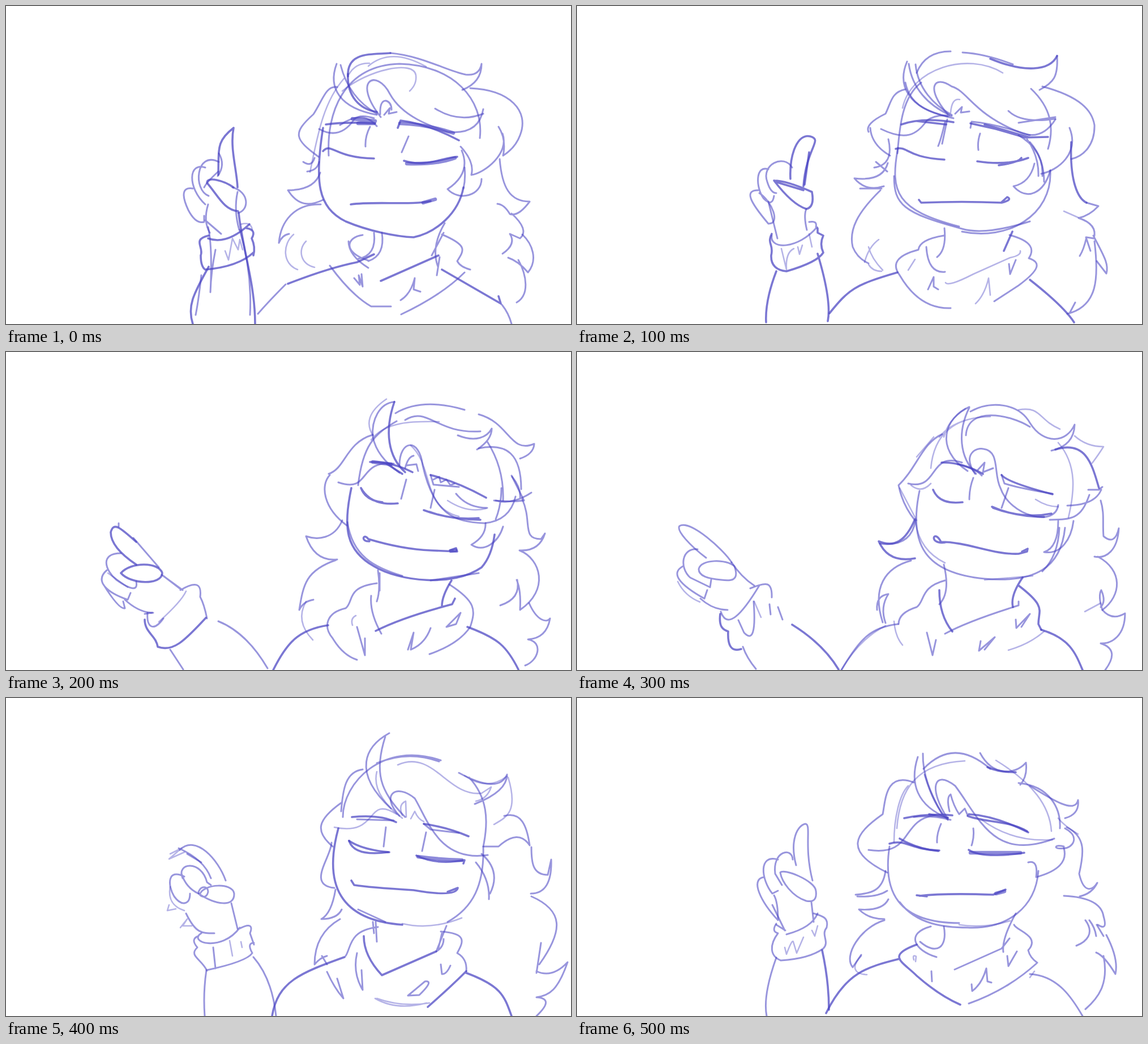
An HTML page that plays this animation: 998 by 561 pixels, repeating every 600 ms.

```html
<!DOCTYPE html>
<html lang="en">
<head>
<meta charset="utf-8">
<title>Pointing sketch</title>
<style>
html, body { margin: 0; width: 100%; height: 100%; overflow: hidden; background: #fff; }
svg { display: block; width: 100vw; height: 100vh; }
path { fill: none; stroke: #4843c3; stroke-width: 3; stroke-opacity: .56; stroke-linecap: round; stroke-linejoin: round; }
.light { stroke-width: 2.6; stroke-opacity: .4; }
.bold { stroke-width: 3.6; stroke-opacity: .72; }
.fat { stroke-width: 6.5; stroke-opacity: .62; }
g { visibility: hidden; animation: show 600ms step-end infinite; animation-delay: calc(var(--i) * 100ms - 600ms); }
@keyframes show { 0% { visibility: visible; } 16.666%, 100% { visibility: hidden; } }
</style>
</head>
<body>
<svg viewBox="0 0 998 561" preserveAspectRatio="none">

<g style="--i:0">
<path class="bold" d="M604 124C602 80 645 86 679 83"/>
<path d="M679 83C735 88 780 115 812 121Q836 124 840 102Q840 135 806 148"/>
<path d="M570 264C566 190 595 105 695 102C790 104 845 165 837 233"/>
<path class="light" d="M594 150C640 112 720 95 724 122Q726 138 713 150M640 106Q680 72 742 107M606 120Q618 100 642 101"/>
<path d="M584 102C568 145 590 180 655 192"/>
<path d="M591 104C600 140 620 170 655 190"/>
<path class="bold" d="M604 120C602 160 625 182 655 187"/>
<path d="M585 143C565 140 560 165 543 191C505 225 510 235 552 266"/>
<path class="light" d="M597 128C560 170 550 230 537 293"/>
<path d="M553 217C580 232 600 222 615 200Q625 190 650 198"/>
<path d="M662 196C610 130 655 110 678 155C700 195 750 212 780 222Q835 228 843 182"/>
<path d="M758 181Q800 207 843 190M661 191Q660 167 671 167Q681 170 681 183M668 192L678 180L676 190L690 187"/>
<path d="M820 145C890 148 925 185 908 228Q900 250 878 264Q884 235 870 213M877 225C890 260 845 295 822 298Q828 275 803 248"/>
<path d="M805 255Q822 295 780 323C800 345 840 335 840 305"/>
<path d="M872 270C876 320 890 345 925 345Q905 372 890 367Q880 350 868 349M893 366Q925 395 908 410L890 402Q902 420 877 437"/>
<path d="M912 403C930 420 940 448 922 470Q905 450 887 444M905 448C920 475 925 510 902 523"/>
<path d="M525 275Q540 285 545 268M532 292Q550 290 553 275M555 294Q545 325 498 325C515 352 535 354 560 342M556 350C510 348 485 380 482 418Q488 404 500 402"/>
<path class="light" d="M508 403C488 420 488 455 515 465M530 415C515 430 520 455 545 461"/>
<path class="bold" d="M560 215C545 310 550 355 600 380C640 397 690 407 720 408C760 400 800 365 808 320"/>
<path d="M808 322Q812 305 810 285M590 210Q630 182 655 212M643 213Q634 230 635 248M711 230L699 258"/>
<path class="bold" d="M565 209Q600 204 652 207M692 215L697 202Q745 208 800 237M560 256C575 240 580 268 650 269M703 273C740 285 770 268 797 266"/>
<path class="fat" d="M612 199L652 203M622 207H650M696 207Q740 208 790 224M708 278Q760 280 793 268M737 347L758 341"/>
<path class="bold" d="M609 350C650 344 720 352 750 344"/>
<path d="M650 400Q655 440 622 446M664 400Q670 440 640 450M630 404C600 408 595 435 640 449M605 415Q605 440 640 462"/>
<path class="bold" d="M498 490Q570 462 620 452L650 438M662 485Q710 464 764 440M770 465L874 525L870 512"/>
<path d="M775 383Q750 425 763 460M770 403C815 422 810 430 797 450Q802 460 820 465M766 443L761 475M773 400L752 440"/>
<path d="M572 458Q610 510 645 530H680M698 544Q770 510 810 470M494 491Q465 520 445 543M876 527Q888 542 893 561"/>
<path d="M615 480L625 492L623 475L630 495L628 473M697 519Q715 508 722 480L720 500L732 504"/>
<path class="bold" d="M402 215C372 238 376 250 375 298M402 215C395 250 408 290 409 320"/>
<path d="M376 275C335 255 330 325 358 335M352 285C322 275 320 320 352 350M330 322C305 318 315 345 322 360Q335 385 350 381V370M376 260Q388 280 374 300"/>
<path class="bold" d="M402 320C385 308 355 300 355 312C375 335 385 360 410 362"/>
<path d="M375 292Q355 310 350 320M400 320C430 328 430 360 410 365M409 328Q402 360 412 395M357 350Q348 380 360 400M352 378L380 402"/>
<path class="bold" d="M357 410Q390 422 430 385M358 405C328 412 350 425 344 440Q344 460 352 465Q410 460 437 435M425 392Q443 395 434 410Q441 425 437 440"/>
<path class="light" d="M415 385Q433 380 435 395M387 432L393 448L400 410L410 430L413 412L418 430"/>
<path d="M357 390Q365 425 361 505M370 430Q362 470 361 505M345 475Q340 520 335 545M413 395Q435 470 431 545"/>
<path class="bold" d="M358 460C330 510 320 530 330 561M411 365C418 430 440 490 440 561"/>
</g>

<g style="--i:1">
<path d="M600 118Q615 80 660 80M681 82Q720 84 770 103M845 200Q820 240 780 222C700 190 690 150 662 142C630 120 615 145 655 191"/>
<path class="bold" d="M730 93C790 118 835 115 848 88"/>
<path d="M848 88C850 125 842 135 817 148"/>
<path class="light" d="M575 180C590 110 690 80 752 118M660 188Q662 162 676 165"/>
<path d="M566 260C570 210 575 160 608 135M583 98C565 140 585 180 655 195"/>
<path d="M586 102C592 145 620 175 658 192M580 135C588 175 620 188 665 198"/>
<path d="M598 103C602 145 630 175 662 192"/>
<path d="M580 147C555 152 555 170 545 190Q508 208 515 222M518 215Q520 245 553 264M537 217C580 238 600 228 618 202Q635 190 662 194"/>
<path d="M762 185Q785 208 845 199M780 206L845 196M668 190L680 178L678 188L693 186M802 146C838 180 843 215 832 252"/>
<path d="M822 142C890 160 910 185 914 210C915 245 895 265 873 270M870 215C888 260 850 290 820 296"/>
<path d="M780 228Q825 255 822 300M795 235Q816 265 815 300"/>
<path d="M808 278Q800 312 771 318C795 345 825 330 836 290"/>
<path class="bold" d="M873 240C870 310 885 340 900 347"/>
<path d="M900 347L921 353Q905 370 886 374Q920 385 913 410L900 408Q895 430 888 441M899 408L907 432M912 405C930 440 940 455 935 472L918 450"/>
<path d="M914 415C922 480 920 530 866 543M880 523L870 542"/>
<path class="light" d="M860 362L885 373M533 412Q515 425 508 452M515 425Q520 445 540 466M515 456Q522 468 538 468"/>
<path d="M550 235C557 265 548 282 525 285M528 275L548 292M549 277Q540 310 490 304Q510 328 542 318M500 322H538M536 325C495 365 480 395 487 425Q495 445 515 454"/>
<path d="M567 250C552 330 565 360 675 389"/>
<path d="M560 300C560 350 575 365 680 393Q720 405 800 380"/>
<path d="M680 398C760 415 840 370 836 290M800 240Q825 268 825 310"/>
<path class="bold" d="M573 209Q610 196 665 205M600 203L652 209M832 231L792 232L740 217L695 207M720 209L800 232"/>
<path d="M695 215L697 204Q740 208 800 228M650 205Q643 235 638 247M654 200L645 243M712 225Q707 240 709 254"/>
<path class="bold" d="M563 252C585 246 580 267 649 271M707 274Q760 282 797 268M745 281Q780 276 785 268M604 342L608 347Q680 344 750 347Q770 342 760 337L750 346"/>
<path d="M649 392Q653 430 636 443M648 405Q605 412 603 430C565 440 555 455 570 475Q605 535 660 533M617 425Q620 472 650 469"/>
<path class="bold" d="M769 398L754 432"/>
<path d="M764 404C805 415 808 430 798 445C820 452 818 465 780 493L737 521"/>
<path class="light" d="M651 488Q655 496 700 473L765 444Q785 440 783 432M597 447L585 466M704 525Q720 510 727 480L730 510"/>
<path d="M620 500L630 478L630 495L638 500M763 455L765 473L775 448"/>
<path class="bold" d="M800 483Q860 530 878 558M566 470C490 492 480 500 446 542M377 305C375 260 390 225 412 230C435 236 405 250 400 318"/>
<path class="bold" d="M410 258L402 315"/>
<path d="M380 285C365 260 325 280 336 310Q342 330 352 330M338 288C315 280 315 320 330 340Q345 355 348 335M320 325C295 325 305 345 338 384C360 385 345 345 322 330"/>
<path class="bold" d="M348 308Q370 308 415 328Q420 355 405 358Q380 350 348 308M350 310L400 325"/>
<path d="M405 358Q400 370 406 395M338 345L354 410M410 381Q425 378 422 390M344 405C340 430 390 430 424 390"/>
<path class="bold" d="M344 402C335 420 348 420 343 440Q342 465 370 468Q425 452 435 435Q428 420 435 405L425 400V392M352 468Q332 520 334 558M425 437Q450 520 443 556"/>
<path class="light" d="M361 428L370 465Q368 435 383 428M390 425L393 438L398 422M410 402L415 425"/>
</g>

<g style="--i:2">
<path class="light" d="M672 83Q625 115 650 150M645 155C670 122 720 122 765 123M715 165C755 200 735 275 800 290"/>
<path d="M686 88C660 90 645 120 648 150Q655 185 695 213"/>
<path class="bold" d="M686 88C668 140 675 185 705 212"/>
<path d="M688 108Q735 80 810 102M705 120C745 95 760 145 838 140M835 110C890 125 890 180 933 162Q932 180 908 188"/>
<path d="M798 147C830 160 850 150 858 135Q858 155 832 172M850 158Q880 205 878 262M622 235C630 165 650 145 690 122"/>
<path d="M648 146C600 160 600 205 570 215M572 217C555 235 560 275 602 306M587 230C645 250 620 190 685 197"/>
<path d="M695 200C695 155 730 150 736 200C755 285 790 300 845 302Q890 298 900 255"/>
<path d="M795 250Q815 275 850 275M705 205Q710 185 720 183M708 200L725 198L728 210"/>
<path class="light" d="M780 262Q815 285 848 276"/>
<path d="M835 170C885 160 910 180 910 242M893 218L915 262Q890 265 862 262"/>
<path d="M928 248Q895 270 865 262M894 220Q910 240 908 258M875 240Q875 270 865 295M847 302Q848 325 822 340C845 355 870 335 878 308"/>
<path d="M912 260C930 300 910 330 945 330L952 320Q942 352 907 350C945 365 960 420 908 455Q910 420 902 402M903 402Q910 435 873 447"/>
<path d="M924 443C938 475 955 478 961 470Q955 505 922 507C950 512 940 545 917 553"/>
<path d="M594 297C580 330 550 332 530 325Q545 370 585 366M583 367C530 385 525 410 518 455Q525 440 543 437"/>
<path class="light" d="M530 440Q510 475 542 508"/>
<path class="bold" d="M610 240C595 310 600 350 650 378C695 405 790 415 840 380Q858 360 863 322"/>
<path d="M603 300C612 360 650 380 700 395M750 403L835 390"/>
<path class="bold" d="M643 194Q680 193 718 212M672 197L700 215M750 217Q800 230 848 257"/>
<path class="fat" d="M648 194L680 198M786 351L794 350"/>
<path d="M750 217L755 234L800 238M755 225L765 220L768 230L778 225L785 235L792 232M707 225L698 259M757 243L750 275"/>
<path class="bold" d="M627 240Q645 272 692 267M627 240Q635 262 665 265M738 279Q780 295 838 296M748 282Q790 297 835 293"/>
<path class="bold" d="M642 334C625 335 632 318 640 330Q700 348 750 350L797 352L795 346L784 350"/>
<path d="M657 385Q662 420 655 440M660 390V421M655 408C600 415 615 440 600 452C565 460 560 485 577 505Q595 535 620 543M645 430Q642 460 663 497"/>
<path class="bold" d="M787 403Q770 430 770 448M653 492Q700 468 788 445L793 435"/>
<path d="M783 410C830 440 830 455 820 485Q800 515 748 533M620 485L634 535V505M710 525L720 495L715 525Q740 515 750 487M778 485L803 460L795 480L778 485"/>
<path class="light" d="M612 482Q608 470 618 465M180 390L215 415M318 422Q310 440 270 476"/>
<path class="bold" d="M815 485C870 505 885 520 905 560M569 482C515 490 495 515 472 561M230 335C200 308 190 300 185 318Q185 345 230 375"/>
<path d="M199 302V308M225 328L270 380M203 355C165 355 175 385 195 402Q235 430 230 405M178 385C155 405 180 425 215 437L220 425M172 410Q200 455 210 452L207 440M210 437Q235 460 260 460"/>
<path class="bold" d="M203 390C220 370 270 370 276 390C275 412 220 410 203 390"/>
<path d="M275 393L312 420M278 395L308 418M308 420C342 400 345 415 343 432Q350 445 355 470M250 460C248 485 260 495 278 470"/>
<path class="bold" d="M245 472C245 495 265 500 268 520C295 530 315 510 353 469"/>
<path d="M245 462L258 460M290 525L313 560M375 475Q425 495 462 558"/>
</g>

<g style="--i:3">
<path d="M693 97C650 115 630 170 690 210M693 98C672 140 675 185 705 215"/>
<path class="light" d="M686 100Q655 120 648 150M640 150Q660 125 700 117M625 205C630 150 660 115 730 114"/>
<path d="M695 105C730 85 780 90 800 125C825 165 865 160 879 128Q878 165 838 174M687 147C690 95 765 110 800 132"/>
<path class="light" d="M780 102C820 95 815 120 853 136M850 160C885 200 878 250 868 292M879 148Q900 167 930 167Q922 180 910 196"/>
<path class="bold" d="M845 172C900 155 910 200 922 240"/>
<path d="M928 238L922 243H903M926 243Q915 270 866 271M905 252C890 295 875 295 835 296"/>
<path d="M645 145C610 160 600 205 568 235Q575 270 597 297M585 232C640 245 620 175 680 195"/>
<path class="light" d="M630 150L600 185M570 240L600 297M590 235Q608 250 625 232M810 260Q830 273 850 273M925 443L897 458"/>
<path d="M703 215C680 180 705 168 718 171C748 175 735 215 748 240C765 290 845 310 850 270M708 208L720 195L717 212L735 205"/>
<path d="M850 298Q850 345 825 353C855 358 873 330 877 298M535 338Q590 345 598 297"/>
<path class="bold" d="M597 295C580 335 560 345 533 334Q550 373 597 364"/>
<path d="M590 368C545 380 520 415 540 477M530 455Q528 430 550 427Q535 450 545 478"/>
<path d="M925 262C932 285 928 300 930 325Q950 342 957 311C955 350 935 365 914 361M920 361C965 385 962 430 928 455Q920 430 926 420Q935 440 925 450"/>
<path d="M928 455Q945 475 968 461C968 500 945 515 925 514Q960 525 933 561"/>
<path d="M605 245C585 340 615 390 720 400C810 408 855 380 862 310"/>
<path class="light" d="M598 300Q605 350 650 372M720 402L805 395"/>
<path d="M852 310Q850 360 822 387M672 198Q705 206 715 218M750 217L755 232Q780 240 840 250M700 222Q693 240 693 260M762 240L750 275"/>
<path class="bold" d="M644 195Q680 194 717 215M840 251Q760 230 750 217M629 243Q640 270 681 265M733 273Q770 290 825 291M735 275Q790 295 838 285"/>
<path class="bold" d="M650 336C620 340 630 310 643 335C690 335 735 358 780 356L795 352L796 347L786 352"/>
<path d="M648 375Q660 425 640 445M650 403C605 415 615 440 600 450Q568 460 568 480M650 497Q690 475 780 447V440M775 472L776 487L800 462L785 485"/>
<path class="bold" d="M787 398Q765 430 770 450M640 420Q640 465 663 493M780 412C830 450 815 455 815 480L820 490"/>
<path class="light" d="M825 493Q800 515 762 526M560 475Q562 502 575 517M545 483Q500 505 467 561"/>
<path d="M618 495L628 535L634 508M710 527L713 510M710 527L738 503L720 525M567 480C520 485 500 505 467 561"/>
<path class="bold" d="M820 490C870 505 880 530 893 561M380 481Q435 515 462 560"/>
<path d="M228 363C200 342 175 315 181 307C200 295 260 350 273 371M215 383C218 365 265 365 278 378C288 405 270 404 255 402C230 400 215 395 215 383"/>
<path d="M213 348C185 345 180 380 200 398L235 415L237 402M187 378C165 390 180 410 225 435L230 420M218 435Q240 455 266 455M273 371Q290 397 313 412"/>
<path class="light" d="M178 405Q190 430 217 441M313 440L325 468"/>
<path d="M322 412C290 465 265 490 254 458M306 417C335 405 345 405 344 433M285 473L295 495Q318 520 312 440M340 445L342 463M355 450L363 472"/>
<path class="bold" d="M253 462C250 485 258 490 267 493Q265 532 290 524"/>
<path d="M293 520Q300 540 316 559"/>
</g>

<g style="--i:4">
<path d="M677 62C635 85 610 130 680 195M670 68C650 130 660 165 705 210"/>
<path class="light" d="M655 130Q645 170 700 212M692 118C755 90 780 175 840 168L857 157Q850 178 830 182"/>
<path d="M595 210C595 150 665 75 768 110M655 115Q710 92 765 112"/>
<path d="M800 132Q870 170 885 135Q885 165 828 187M818 140C850 175 853 215 843 262"/>
<path class="light" d="M810 137Q850 165 885 138M887 140C905 200 885 210 862 223M700 207Q692 188 706 182L707 210M715 213L722 200Q728 214 738 218"/>
<path d="M880 208C910 200 920 225 925 260Q905 230 870 262H845M630 126C600 130 595 160 592 200M592 185C550 215 545 235 577 262"/>
<path class="light" d="M580 228C660 245 635 170 690 205"/>
<path d="M695 208C660 170 690 150 722 177C745 215 765 290 851 277"/>
<path d="M928 263C928 290 930 312 957 312L963 285Q965 345 927 345M928 350C985 375 985 410 942 470M945 432L937 485M937 482Q965 495 992 466C975 515 960 525 937 528Q970 530 937 561"/>
<path d="M840 275Q875 305 855 345M830 290Q855 320 853 355M575 255C575 280 530 330 580 335M582 338Q575 380 557 390Q585 390 593 373M590 390C555 410 545 440 545 470Q555 458 567 455M558 455L567 470"/>
<path class="bold" d="M587 230C560 330 590 392 700 400"/>
<path d="M622 373L670 395M780 395C825 370 845 330 843 262"/>
<path class="light" d="M700 398Q750 410 805 388"/>
<path class="bold" d="M611 210Q660 205 689 219M738 222Q780 228 817 244M606 252Q630 268 677 272"/>
<path class="bold" d="M606 252Q615 280 675 272M725 278Q760 295 810 286L808 292"/>
<path class="fat" d="M728 280Q765 285 805 286"/>
<path d="M620 214L685 216M738 222L750 232L800 238M671 228L667 262M742 237L735 270"/>
<path class="bold" d="M610 322L615 330Q640 334 720 339Q795 352 798 335L780 342M632 420Q632 455 664 489L760 447"/>
<path d="M653 395L655 430M648 395L650 415M778 402L760 447M770 415L763 445M657 404C605 410 610 440 600 455M760 447Q773 440 773 425"/>
<path d="M768 412C815 415 808 430 797 450Q815 460 813 482"/>
<path class="bold" d="M813 482Q785 510 745 545M813 485C875 508 880 525 893 561M598 457C520 485 480 500 470 561"/>
<path class="light" d="M652 530Q690 552 743 538M655 530Q700 546 748 538"/>
<path d="M567 483Q580 512 596 530L585 495M620 450Q612 485 630 515L628 480M710 525L740 500Q757 498 730 524L710 525M768 470L770 487Q778 488 785 472"/>
<path d="M437 457Q470 495 477 561M354 480Q348 520 351 561M307 268C335 240 375 285 388 322M305 265Q350 285 362 318"/>
<path class="light" d="M290 275L310 265L288 284L315 272M290 333C285 360 300 370 315 375M288 365L285 375L300 372M308 405L320 390L312 402H328"/>
<path d="M320 275L345 290M343 345C350 328 400 325 403 345C404 370 370 365 340 345M340 342C345 330 357 332 357 342C354 355 342 352 340 342"/>
<path d="M312 318C300 290 345 285 355 325L362 330M310 310Q318 335 340 345M315 315C285 300 285 330 297 350C310 368 325 365 325 345M318 380C335 415 345 415 368 415M398 362L409 407"/>
<path d="M345 415C320 430 380 450 413 405M340 420Q325 425 338 440C322 455 345 460 355 481M355 480Q425 465 435 450Q425 432 438 432M412 407C435 395 435 405 431 415L438 435M366 440L370 477"/>
<path class="light" d="M395 428L400 455M415 430L417 440"/>
</g>

<g style="--i:5">
<path d="M602 104C587 150 600 190 655 212M611 98C610 135 625 170 645 205"/>
<path d="M614 135Q630 190 655 215M612 125C650 85 690 90 730 125"/>
<path class="light" d="M565 230C570 160 600 115 685 111M560 255C560 210 570 170 585 155M740 110C805 150 835 190 838 235"/>
<path d="M712 97C735 140 775 135 793 114Q796 138 783 153M780 150C835 155 855 195 853 230"/>
<path class="bold" d="M725 122Q745 131 775 131"/>
<path d="M800 155C840 180 880 205 885 180Q888 205 862 212M862 230C890 245 875 265 860 265C840 268 843 257 860 262"/>
<path d="M595 149C545 130 545 180 540 205C490 240 470 270 548 308M515 268C595 280 570 215 632 207"/>
<path d="M655 213C620 160 630 125 668 155C710 210 735 290 843 248"/>
<path class="light" d="M715 215Q770 255 840 250M850 212Q860 225 885 240"/>
<path d="M658 200Q652 175 660 170Q665 190 675 205L685 195L690 207"/>
<path d="M865 228C900 245 895 275 887 310C895 345 910 340 919 326Q910 345 888 350M860 349Q925 352 930 385Q938 412 920 400"/>
<path d="M898 392C915 415 900 430 882 437M905 392Q915 405 917 420M918 400L930 420M935 418Q957 460 951 487Q932 455 917 449M930 455C940 505 920 530 898 549"/>
<path d="M860 265Q870 300 811 316Q815 285 797 290M545 305C540 340 520 345 492 347M548 340Q530 352 495 350M550 355Q540 376 498 373Q515 390 543 390M543 392C500 405 470 455 487 475L502 453"/>
<path class="light" d="M502 455C483 475 490 487 512 488M675 400Q720 407 765 393"/>
<path d="M552 262C540 340 565 397 675 397M570 360C600 400 650 405 690 405C760 408 810 370 815 305"/>
<path class="bold" d="M578 212Q620 203 663 207M692 205Q740 208 797 237M552 257C580 248 590 268 640 269"/>
<path class="bold" d="M622 205L655 211M690 208C720 220 760 215 795 235M570 248Q600 266 638 270M692 268C715 283 770 276 790 273"/>
<path class="fat" d="M695 273H783M740 345L755 341"/>
<path d="M595 210Q625 206 660 215M643 222Q635 240 636 255M700 230Q702 245 697 260"/>
<path class="bold" d="M600 348L618 350M605 349Q650 344 735 347L757 338"/>
<path d="M648 403C655 440 635 455 606 430M625 403C580 415 595 445 635 457M775 380Q750 425 753 448M667 479L750 442L764 424"/>
<path d="M772 400C775 410 820 420 797 445Q800 458 813 467M692 539Q760 515 812 468M626 482L627 500M697 505L698 517Q715 505 723 477L725 500L732 502M760 455L762 473L777 447"/>
<path class="bold" d="M600 435C545 455 575 465 600 490Q640 525 677 541M570 460C510 475 475 485 440 556"/>
<path class="light" d="M595 462Q592 452 599 456L598 465M800 493L808 482"/>
<path d="M800 487C850 490 875 530 893 561M387 295C375 250 390 225 403 222C415 222 400 260 416 322"/>
<path d="M381 285C380 262 345 270 350 310L362 330M355 285C320 275 325 320 345 345L355 340M330 316C305 320 325 360 355 392Q355 360 348 348"/>
<path d="M359 308C365 300 420 322 422 340Q425 362 405 358C380 350 362 325 359 308M345 365L367 410M414 360L418 395M370 417Q415 405 425 380M352 400L368 410"/>
<path d="M352 398Q343 412 355 415C340 435 340 455 360 463Q410 460 435 442C447 430 430 418 441 405C445 388 435 385 418 380"/>
<path class="light" d="M367 440L370 452Q380 425 382 430L388 450L400 422M415 410L420 420L425 402"/>
<path d="M352 458Q328 525 335 561"/>
<path class="bold" d="M433 445Q445 500 445 550"/>
</g>
</svg>
</body>
</html>
```
